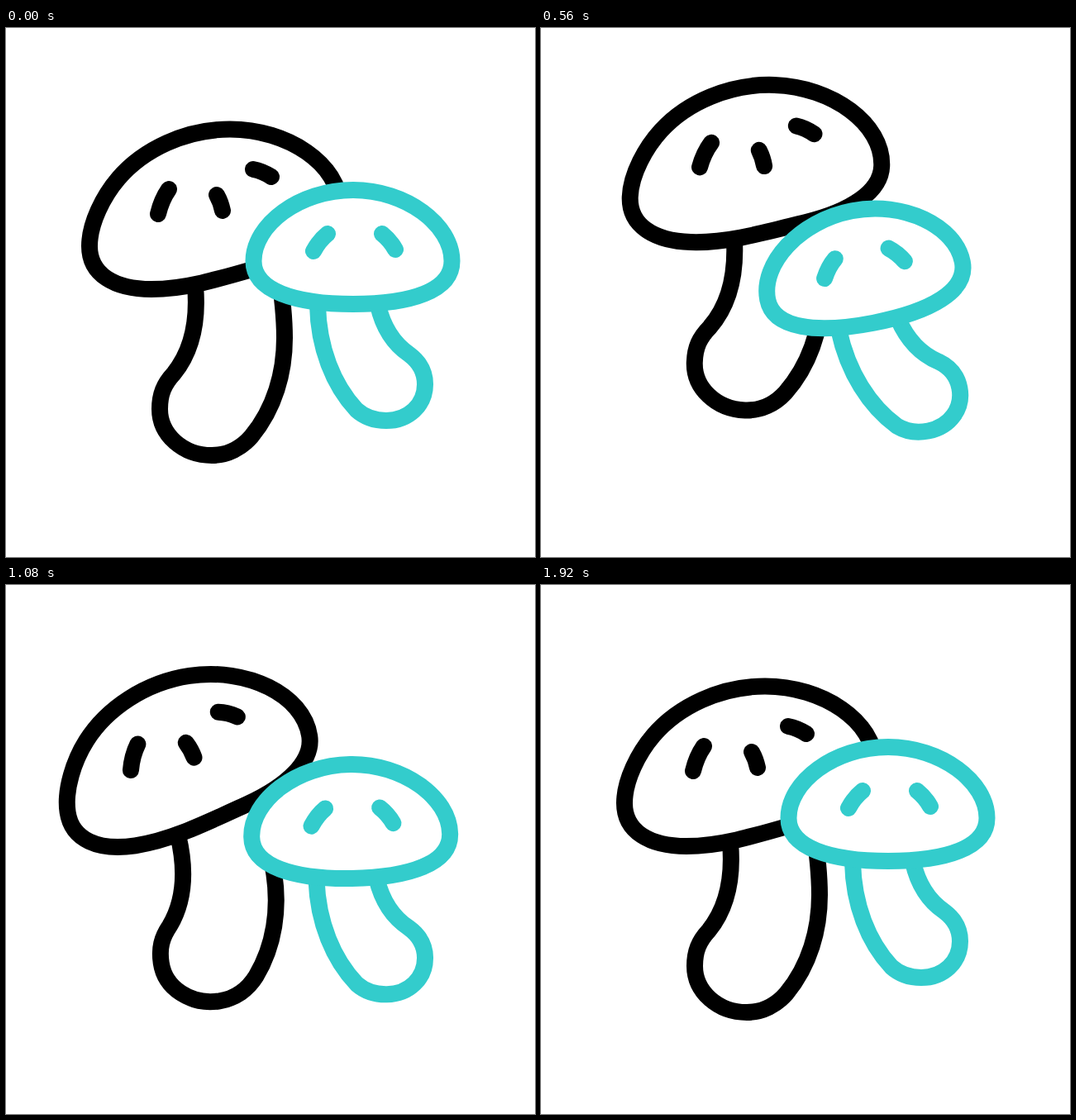
An HTML page for the animation above (2200 ms loop, 640 by 640 pixels).

```html
<!DOCTYPE html>
<html lang="en">
<head>
<meta charset="utf-8">
<title>Mushrooms</title>
<style>
  html, body { margin: 0; width: 100%; height: 100%; overflow: hidden; background: #fff; }
  svg { display: block; width: 100%; height: 100%; }
  g { fill: #fff; stroke-width: 20; stroke-linejoin: round; }
  .dots { fill: none; stroke-linecap: round; }
</style>
</head>
<body>
<svg viewBox="0 0 640 640">
  <g id="big" stroke="#000">
    <path d="M229 312C233 358 224 392 203 418C191 431 186 443 186 461C186 492 214 517 249 517C268 517 285 508 297 494C325 460 337 417 337 375C337 350 334 322 329 290"/>
    <path d="M101 264C101 236 118 203 136 182C166 147 217 122.5 271 122.5C341 122.5 404 165 404 216C404 247 368 272 315 287C260 303 218 316 176 316C131 316 101 298 101 264Z"/>
    <path class="dots" d="M197 195Q188 208 184 225M255 202Q260 211 262 221M299 171Q310 173 321 180"/>
  </g>
  <g id="small" stroke="#33cccc">
    <path d="M377 335C378 387 396 432 424 462C434 471 446 475 460 475C487 475 507 456 507 431C507 416 500 404 488 395C469 382 456 362 450 335"/>
    <path d="M299.5 282C299.5 238 355 196 420 196C484 196 539.5 238 539.5 282C539.5 318 490 334 420 334C350 334 299.5 318 299.5 282Z"/>
    <path class="dots" d="M389 249Q379 257 372 270M455 249Q465 257 471 268"/>
  </g>
</svg>
<script>
  const LOOP = 2200, TICK = 40, END = 1920;

  // [time in ms, value]: sway in degrees, hop in pixels
  const sway = [[0, 0], [200, -11], [335, -18.7], [440, -11], [560, 2], [735, 15], [880, 6.6],
    [960, -0.9], [1085, -8.5], [1430, 4.2], [1560, 2], [1800, 0]];
  const hop = [[0, 0], [200, 43], [265, 54], [320, 48], [440, 13.3], [560, -54.5], [590, -56.5],
    [760, -5], [885, 31.5], [960, 20.3], [1080, -13], [1200, -34], [1440, 20.5], [1520, 37],
    [1560, 33], [1680, 10.5], [1800, 0]];

  const parts = [
    { el: document.getElementById('big'), x: 249, y: 454, delay: 0 },
    { el: document.getElementById('small'), x: 460, y: 430, delay: 120 }
  ];

  const rise = (a, b) => (b[1] - a[1]) / (b[0] - a[0]);

  // Slope at a key: flat at turning points and ends, harmonic mean elsewhere
  function slope(keys, i) {
    if (i === 0 || i === keys.length - 1) return 0;
    const a = rise(keys[i - 1], keys[i]), b = rise(keys[i], keys[i + 1]);
    return a * b > 0 ? 2 * a * b / (a + b) : 0;
  }

  function valueAt(keys, t) {
    const last = keys.length - 1;
    if (t <= keys[0][0]) return keys[0][1];
    if (t >= keys[last][0]) return keys[last][1];
    const i = keys.findIndex(k => k[0] > t) - 1;
    const [t0, v0] = keys[i], [t1, v1] = keys[i + 1];
    const span = t1 - t0, p = (t - t0) / span, q = 1 - p;
    return q * q * ((1 + 2 * p) * v0 + p * span * slope(keys, i))
      + p * p * ((3 - 2 * p) * v1 - q * span * slope(keys, i + 1));
  }

  function draw(now) {
    const t = Math.min(END, Math.floor((now % LOOP) / TICK) * TICK);
    for (const { el, x, y, delay } of parts) {
      const turn = valueAt(sway, t - delay), dy = valueAt(hop, t - delay);
      el.setAttribute('transform', `translate(0 ${dy}) rotate(${turn} ${x} ${y})`);
    }
  }

  const start = performance.now();
  function loop() {
    draw(performance.now() - start);
    requestAnimationFrame(loop);
  }
  loop();
</script>
</body>
</html>
```
